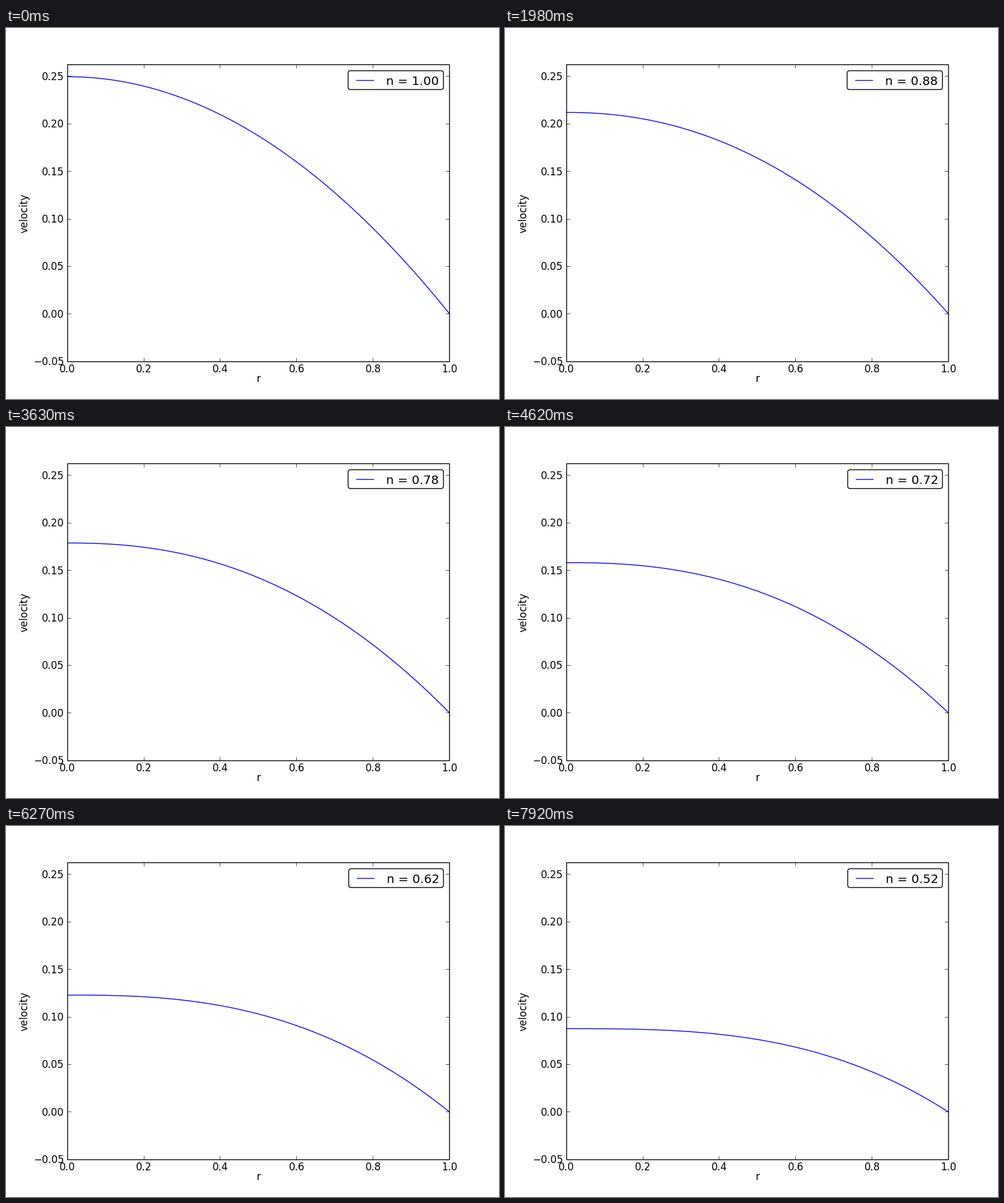
These frames come from a looping animation (812x612 px, 8000 ms). A matplotlib script:

```python
import numpy as np
import matplotlib.pyplot as plt
from matplotlib.animation import FuncAnimation
from matplotlib.lines import Line2D
from matplotlib.patches import FancyBboxPatch, Rectangle
from matplotlib.transforms import Affine2D

W, H, DPI = 812, 612, 100
LOOP, TICK, STEP = 8000, 20, 330          # ms
LEFT, RIGHT, TOP, BOTTOM = 101.5625, 731.25, 60.75, 550.75
Y_MIN, Y_MAX = -0.05, 0.2625

plt.rcParams["font.family"] = "DejaVu Sans"
# the small margin keeps the size from being rounded down
fig = plt.figure(figsize=((W + 0.001) / DPI, (H + 0.001) / DPI), dpi=DPI,
                 facecolor="white")
# pixel coordinates with y pointing down
px = Affine2D().scale(1, -1).translate(0, H).scale(1 / DPI) + fig.dpi_scale_trans

ax = fig.add_axes([LEFT / W, 1 - BOTTOM / H, (RIGHT - LEFT) / W, (BOTTOM - TOP) / H])
ax.set(xlim=(0, 1), ylim=(Y_MIN, Y_MAX))
ax.axis("off")


def crisp(v):
    """Centre of the pixel a thin line falls on."""
    return np.floor(v - 0.5) + 0.5


def stroke(xs, ys, width, color="black", cap="butt"):
    line = Line2D(xs, ys, lw=width, color=color, transform=px, snap=False,
                  solid_capstyle=cap, zorder=3)
    return fig.add_artist(line)


def label(x, y, text, size=12, **kw):
    kw.setdefault("va", "baseline")
    return fig.text(x, y, text, transform=px, fontsize=size, zorder=5, **kw)


x0, x1, y0, y1 = (crisp(v) for v in (LEFT, RIGHT, TOP, BOTTOM))
fig.add_artist(Rectangle((x0, y0), x1 - x0, y1 - y0, fill=False, ec="black",
                         lw=1, transform=px, snap=False, zorder=4))

for v in np.arange(6) / 5:
    x = LEFT + v * (RIGHT - LEFT)
    for edge, d in ((y0, 6), (y1, -6)):
        stroke([crisp(x)] * 2, [edge, edge + d], 0.5)
    label(x - 0.5, 568, f"{v:.1f}", ha="center")

for v in np.arange(-1, 6) / 20:
    y = BOTTOM - (v - Y_MIN) / (Y_MAX - Y_MIN) * (BOTTOM - TOP)
    for edge, d in ((x0, 6), (x1, -6)):
        stroke([edge, edge + d], [crisp(y)] * 2, 0.5)
    label(95.5, np.floor(y + 6), f"{v:.2f}".replace("-", "\u2212"), ha="right")

label(415.5, 584, "r", ha="center")
label(39.6, (TOP + BOTTOM) / 2, "velocity", rotation=90, ha="right", va="center")

# legend
box = fig.add_artist(FancyBboxPatch((563.5, 70.5), 157, 31, fc="white", ec="black",
                                    boxstyle="round,pad=0,rounding_size=4", lw=1,
                                    transform=px, snap=False, zorder=4))
key = stroke([577.5, 605.5], [86.5, 86.5], 1, "blue", "projecting")
key.set_zorder(5)
name = label(626, 94, "", 14.4)

r = np.linspace(0, 1, 51)
curve, = ax.plot([], [], color="blue", lw=1, solid_capstyle="projecting")


def velocity(n):
    """Power-law pipe flow, with the slight lag of the numerical solution."""
    m = 1 - 1.0133 * (1 - n)
    return 0.5 ** (1 / m) * m / (m + 1) * (1 - r ** (1 + 1 / m))


def update(i):
    step = (i * TICK + TICK - 1) // STEP
    n = 1 - 0.02 * step
    text = f"n = {n:.2f}"
    shift = int(text.endswith("2"))       # a final 2 is one pixel narrower
    curve.set_data(r, velocity(n))
    name.set_text(text)
    name.set_x(626 + shift)
    key.set_xdata([577.5 + shift, 605.5 + shift])
    box.set_bounds(563.5 + shift, 70.5, 157 - shift, 31)
    return curve, name, key, box


anim = FuncAnimation(fig, update, frames=LOOP // TICK, interval=TICK,
                     init_func=lambda: update(0), repeat=True, repeat_delay=0)
plt.show()
```
